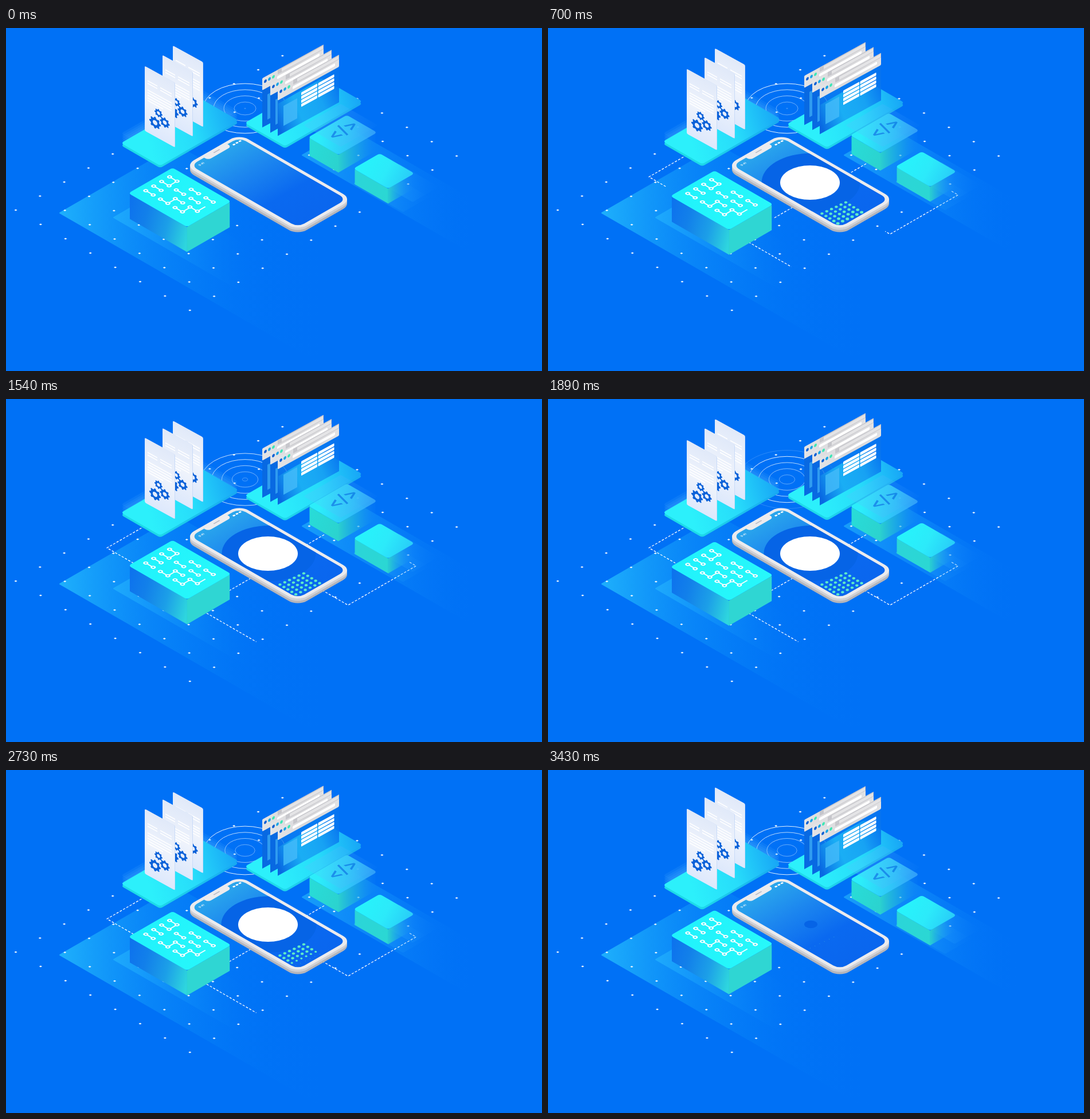
Write an HTML page with a canvas that moves like this. It is 935x599 px and loops after 3500 ms.

```html
<!DOCTYPE html>
<html lang="en">
<head>
<meta charset="utf-8">
<title>Isometric app scene</title>
<style>
html, body { margin: 0; width: 100%; height: 100%; overflow: hidden; background: #0071f6; }
canvas { display: block; }
</style>
</head>
<body>
<canvas id="stage" width="935" height="599"></canvas>
<script>
const ctx = document.getElementById('stage').getContext('2d');
const LOOP = 3500, STEP = 70, BOB = LOOP / 3, RIPPLE = LOOP / 5;
const COS = .866, SIN = .5;
let now = 0;

const clamp = v => Math.max(0, Math.min(1, v));
const span = (from, length) => clamp((now - from) / length);
const outCubic = p => 1 - (1 - p) ** 3;
const inOut = p => p * p * (3 - 2 * p);
const outBack = p => 1 + 2.70158 * (p - 1) ** 3 + 1.70158 * (p - 1) ** 2;
const inBack = p => 1 - outBack(1 - p);
const bob = (amp, delay) => amp * Math.cos((now - delay) / BOB * 2 * Math.PI);

function grad(x0, y0, x1, y1, ...colors) {
  const g = ctx.createLinearGradient(x0, y0, x1, y1);
  colors.forEach((c, i) => g.addColorStop(i / (colors.length - 1), c));
  return g;
}

function rect(fill, x, y, w, h, r = 0) {
  ctx.beginPath();
  ctx.roundRect(x, y, w, h, r);
  ctx.fillStyle = fill;
  ctx.fill();
}

function oval(fill, x, y, rx, ry = rx) {
  ctx.beginPath();
  ctx.ellipse(x, y, Math.max(0, rx), Math.max(0, ry), 0, 0, 7);
  ctx.fillStyle = fill;
  ctx.fill();
}

function line(color, width, x0, y0, x1, y1) {
  ctx.beginPath();
  ctx.moveTo(x0, y0);
  ctx.lineTo(x1, y1);
  ctx.strokeStyle = color;
  ctx.lineWidth = width;
  ctx.stroke();
}

function inSpace(a, b, c, d, x, y, draw) {
  ctx.save();
  ctx.transform(a, b, c, d, x, y);
  draw();
  ctx.restore();
}

// Ground axes start at the left corner: first down-right, second up-right
const ground = (x, y, draw) => inSpace(COS, SIN, COS, -SIN, x, y, draw);
const lettering = (x, y, draw) => inSpace(COS, -SIN, COS, SIN, x, y, draw);
const wall = (x, y, slope, draw) => inSpace(1, slope, 0, 1, x, y, draw);
const shift = (y, draw) => inSpace(1, 0, 0, 1, 0, y, draw);

function tile(x, y, a, b, r, ...colors) {
  ground(x, y, () => rect(grad(0, b * .3, a, b, ...colors), 0, 0, a, b, r));
}

// Ground strip that fades out towards the right of the stage
function strip(x, y, a, b, reach, ...colors) {
  ground(x, y, () => rect(grad(0, 0, reach, reach, ...colors), 0, 0, a, b, 2));
}

function box(x, y, a, b, h, top, left, right) {
  const w = a * COS, d = b * COS, slope = SIN / COS;
  wall(x, y, slope, () => rect(grad(0, 0, w, h * .5, ...left), 2.5, 0, w - 2.3, h));
  wall(x + w, y + a * SIN, -slope, () => rect(grad(0, 0, d, 0, ...right), 0, 0, d - 2.5, h));
  tile(x, y, a, b, 5, ...top);
}

function floor() {
  ctx.fillStyle = '#0071f6';
  ctx.fillRect(0, 0, 935, 599);
  strip(92, 323, 900, 238, 276, 'rgba(32,180,252,.95)', 'rgba(16,150,250,.55)',
    'rgba(4,128,248,.22)', 'rgba(0,113,246,0)');
  strip(186, 331, 420, 87, 142, 'rgba(34,176,253,.8)', 'rgba(20,152,250,.4)', 'rgba(0,116,247,0)');
  strip(515, 222, 400, 96, 178, 'rgba(30,170,250,.8)', 'rgba(18,145,250,.45)', 'rgba(0,113,246,0)');
}

function rings() {
  const p = now % RIPPLE / RIPPLE;
  ctx.lineWidth = 1;
  for (let i = 0; i < 5; i++) {
    const r = 1 + 18 * (i + p);
    ctx.strokeStyle = `rgba(255,255,255,${(.25 + r / 110) * clamp((88 - r) / 14)})`;
    ctx.beginPath();
    ctx.ellipse(417, 140.5, r, r * .595, 0, 0, 7);
    ctx.stroke();
  }
}

function floorDots() {
  for (let i = 0; i < 12; i++) {
    for (let j = 0; j < 8; j++) {
      const x = 17 + 42.3 * i + 43.4 * j, y = 318 - 24.5 * i + 25 * j;
      ground(x, y, () => rect('#eef7ff', -1.5, -1.5, 3, 3, .4));
    }
  }
}

// Dashed path of alternating ground steps, drawn from one fraction to another
function link(delay, x, y, ...steps) {
  const from = inOut(span(2740, 700)), to = outCubic(span(delay, 1460));
  if (to <= from) return;
  const total = steps.reduce((sum, s) => sum + Math.abs(s), 0);
  let done = 0;
  ctx.beginPath();
  steps.forEach((s, i) => {
    const len = Math.abs(s), dx = COS * s, dy = (i % 2 ? -SIN : SIN) * s;
    const a = clamp((from * total - done) / len), b = clamp((to * total - done) / len);
    if (b > a) {
      ctx.lineTo(x + dx * a, y + dy * a);
      ctx.lineTo(x + dx * b, y + dy * b);
    }
    x += dx;
    y += dy;
    done += len || 0;
  });
  ctx.setLineDash([4, 2.6]);
  ctx.lineDashOffset = from * total;
  ctx.strokeStyle = '#fff';
  ctx.lineWidth = 1.25;
  ctx.stroke();
  ctx.setLineDash([]);
}

function links() {
  link(0, 242, 222, 0, -76, 53);
  link(0, 350, 374, 100);
  link(90, 704, 285, 13, -137, -49);
  link(0, 555, 237, 0, -36);
  link(0, 427, 313, 0, -45);
}

function gear(x, y, r) {
  ctx.beginPath();
  for (let i = 0; i < 32; i++) {
    const a = (i - .5) / 32 * 2 * Math.PI, k = i % 4 < 2 ? r : r * .78;
    ctx.lineTo(x + k * Math.cos(a), y + k * Math.sin(a));
  }
  ctx.closePath();
  ctx.moveTo(x + r * .4, y);
  ctx.arc(x, y, r * .4, 0, 7);
  ctx.fillStyle = '#0b62d9';
  ctx.fill('evenodd');
}

function sheet(x, y) {
  wall(x, y, .55, () => {
    rect('#c9dbf8', 1, 0, 52, 113, 2);
    rect(grad(0, 0, 0, 113, 'rgba(226,234,249,.95)', 'rgba(240,244,252,.95)', 'rgba(222,233,252,.95)'),
      0, 0, 52, 113, 2);
    for (let i = 0; i < 2; i++) {
      rect('#fff', 5, 22 + i * 4.5, 17, 1.8);
      rect('#fff', 27, 22 + i * 4.5, 20, 1.8);
    }
    for (let i = 0; i < 5; i++) rect('#fff', 5, 38 + i * 4.6, i < 4 ? 42 : 27, 1.8);
    gear(24, 69, 7);
    gear(18, 89, 10);
    gear(35, 79.5, 8.6);
  });
}

function platform(x, y, a, b, side) {
  tile(x, y + 4, a, b, 5, side, '#18a8f2');
  tile(x, y, a, b, 5, '#2cf0fb', '#27dcfa', '#17a4f6');
}

function documents() {
  for (let k = 4; k > 0; k--)
    tile(200.5, 201 - k * 4.2, 79, 158, 5, 'rgba(90,190,255,.11)', 'rgba(90,190,255,.11)');
  platform(200.5, 199.4 + bob(1.6, -20), 79, 158, '#1ddbe8');
  sheet(291, 34.2 - bob(4.3, -120));
  sheet(273, 49.6 - bob(2.3, -30));
  sheet(242, 68.5 - bob(2.9, 140));
}

function browserBar() {
  rect(grad(0, 0, 107, 0, '#e4e4e6', '#d6d6d9', '#e2e2e4'), 0, 0, 107, 21, 1.5);
  rect('#c6c6cb', 27, 0, 80, 8);
  rect('#e4e4e6', 34, 1.5, 72, 5.5);
  rect('#fff', 26, 11, 74, 5, 1.5);
  ['#0a5fd4', '#18a5e5', '#3ee6b4'].forEach((c, i) => oval(c, 5.5 + 7 * i, 8, 2.4, 2.7));
}

function backBrowser(x, y) {
  wall(x, y, -.55, () => {
    rect('#0869e2', 0, 20, 14, 66);
    rect('#2f9bf0', 9, 33, 5, 44);
    browserBar();
  });
}

function frontBrowser(x, y) {
  wall(x, y, -.55, () => {
    rect(grad(4, 75, 107, 40, '#0868e2', 'rgba(14,130,240,.55)', 'rgba(14,130,240,.6)', '#0673f0'),
      0, 20, 107, 63);
    browserBar();
    rect('rgba(66,186,249,.85)', 10, 36, 24, 35);
    for (let i = 0; i < 8; i++)
      rect('#fff', 41 + i % 2 * 29.5, 29.5 + (i >> 1) * 6.7, 28, 5.2, 1);
  });
}

function browsers() {
  const move = bob(2.2, -80);
  platform(416.5, 167.2 - move * .73, 81, 156, '#1fdbea');
  backBrowser(447, 86 + bob(2.4, 130));
  backBrowser(461, 94.5 + bob(2.6, 30));
  frontBrowser(474, 103.5 + move);
}

function codeCube() {
  shift(-2.3 + bob(2.4, -80), () => {
    box(527, 191, 61, 78, 31,
      ['#2cedfa', '#2fc8f8', 'rgba(60,165,250,.8)'],
      ['#28ddd9', '#2bd3cf'],
      ['#2bd0ce', 'rgba(30,175,225,.6)', 'rgba(20,130,245,.05)']);
    lettering(588, 179, () => {
      ctx.font = '600 30px Inter, sans-serif';
      ctx.textAlign = 'center';
      ctx.textBaseline = 'middle';
      ctx.fillStyle = '#0b84e6';
      ctx.fillText('</>', 0, 0);
    });
  });
  // Glow sliding off the neighbouring platform
  strip(519, 170, 75, 75, 78, 'rgba(80,200,255,.3)', 'rgba(90,180,255,.2)', 'rgba(80,180,255,0)');
}

function smallCube() {
  shift(-1.7 + bob(1.8, 40), () => {
    strip(606, 271.5, 100, 53, 80, 'rgba(40,185,245,.6)', 'rgba(20,130,250,0)');
    strip(640, 264, 80, 53, 66, 'rgba(60,200,255,.5)', 'rgba(20,130,250,0)');
    box(606, 245.5, 70, 53, 26,
      ['#27f3fb', '#2ceafa', '#28cbf8'],
      ['#2bd5d9', '#2bd7d3'],
      ['#2acfd0', 'rgba(30,165,235,.5)', 'rgba(20,130,250,0)']);
  });
}

function node(a, b) {
  oval('#fff', a, b, 3.7);
  oval('#28e8f8', a, b, 1.6);
}

function circuit() {
  const pairs = [];
  for (let row = 0; row < 4; row++) {
    for (let i = 0; i < 3; i++) {
      const a = 13 + 29.5 * i + (i ? row % 2 * 14 : 0), b = 22 + 16 * row;
      pairs.push([a, b]);
      line('#fff', 2, a, b, a + 15, b);
      if (row < 3 && (i * 3 + row) % 4 > 1) line('#fff', 2, a + 15, b, a + 15, b + 16);
    }
  }
  for (const [a, b] of pairs) {
    node(a, b);
    node(a + 15, b);
  }
}

function block() {
  shift(2.4 - bob(2.6, 80), () => {
    box(213.5, 288.5, 118, 89, 43.5,
      ['#20f2fc', '#28f8fa'],
      ['#0c70ee', '#1280ea', '#1c9fe8', '#2ed6de'],
      ['#2fd6d3', '#2fd6d3']);
    ground(213.5, 288.5, circuit);
  });
}

function phoneFace(fill, inset, r, dy = 0) {
  ground(312, 240 + dy, () => rect(fill, inset, inset, 227.5 - 2 * inset, 109.7 - 2 * inset, r));
}

function keypad() {
  const slide = 3 * inOut(span(2800, 630));
  for (let row = 0; row < 5; row++) {
    const enter = outBack(span(330 + row * 40, 330));
    const leave = 1 - span(2640 + (4 - row) * 63, 110);
    const ghost = row ? 0 : .25 * (1 - span(3430, STEP));
    const size = enter * Math.max(leave, ghost);
    ctx.globalAlpha = leave > 0 ? 1 : .35;
    for (let i = 0; i < 6; i++) {
      const x = 478 + 8.3 * i + 6.9 * (row - slide), y = 324 - 3.9 * i + 4.3 * (row - slide);
      oval('#5eecc8', x, y, 2.7 * size, 2.1 * size);
    }
  }
  ctx.globalAlpha = 1;
}

function phone() {
  for (let d = 8; d > 0; d--) phoneFace(d > 4 ? '#b4b5bb' : '#cfd0d5', 0, 18, d);
  phoneFace('#ebebee', 0, 18);
  ground(312, 240, () => {
    rect(grad(0, 0, 227, 0, '#2ba9ec', '#1c86ef', '#0a69f0', '#0a66ee'), 5.8, 5.8, 216, 98.1, 13);
  });

  ctx.save();
  ctx.clip();
  const grow = outBack(span(60, 800)) - inBack(span(2655, 800));
  oval('#0664e6', 458.5, 269.5, 82 * grow, 48.5 * grow);
  const badge = outCubic(span(200, 480)) - inOut(span(2760, 520));
  oval('#fff', 457, 270, 52 * badge, 30 * badge);
  keypad();
  ctx.restore();

  // Notch, speaker and status bar
  lettering(312, 240, () => {
    rect('#ebebee', 33, 4, 47, 10, [0, 0, 6, 6]);
    line('#b9bcc6', 1.8, 51, 7, 63, 7);
    ctx.fillStyle = '#fff';
    ctx.font = '600 5px Inter, sans-serif';
    ctx.fillText('9:41', 14, 16);
    for (let i = 0; i < 3; i++) ctx.fillRect(84 + i * 6, 11.5, 4, 3);
  });
}

function render(ms) {
  now = Math.floor(ms % LOOP / STEP) * STEP;
  floor();
  rings();
  floorDots();
  links();
  documents();
  browsers();
  codeCube();
  smallCube();
  phone();
  block();
}

let start;
function tick(ms) {
  start ??= ms;
  render(ms - start);
  requestAnimationFrame(tick);
}
render(0);
requestAnimationFrame(tick);
</script>
</body>
</html>
```
